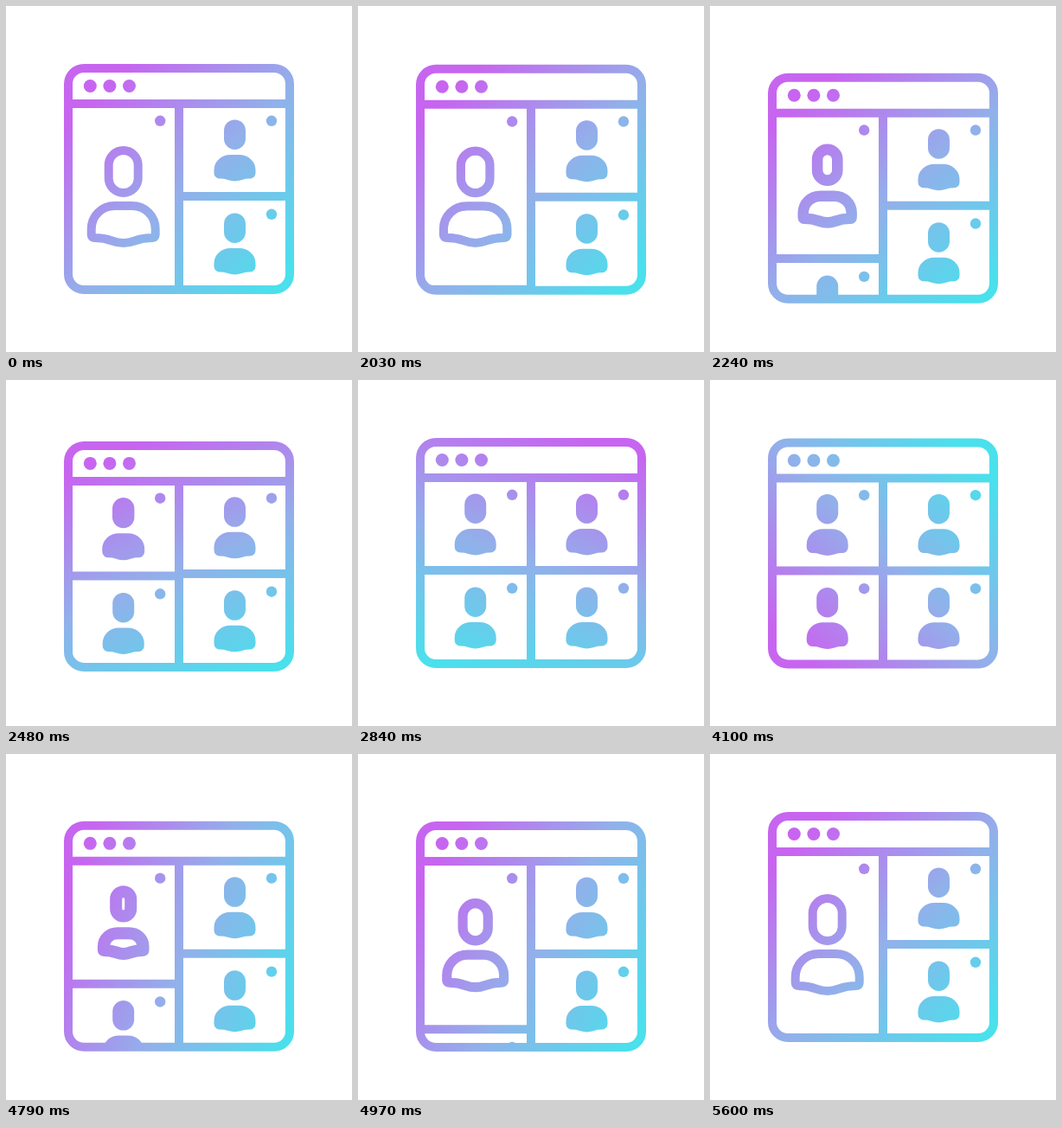
These frames come from a looping animation (400x400 px, 5660 ms). An HTML page with a canvas:

```html
<!DOCTYPE html>
<html lang="en">
<head>
<meta charset="utf-8">
<title>Video call layout</title>
<style>
  html, body { margin: 0; height: 100%; overflow: hidden; background: #fff; }
  canvas { display: block; width: 400px; height: 400px; }
</style>
</head>
<body>
<canvas width="400" height="400"></canvas>
<script>
const LOOP = 5660;
const ctx = document.querySelector('canvas').getContext('2d');
const mix = (a, b, k) => a + (b - a) * k;

// Cubic ease with flat ends; x1 and x2 are the horizontal handles.
function ease(t, from, to, x1 = 1 / 3, x2 = 2 / 3) {
  const u = Math.min(1, Math.max(0, (t - from) / (to - from)));
  if (u === 0 || u === 1) return u;
  let lo = 0, hi = 1, s = u;
  for (let i = 0; i < 20; i++) {
    s = (lo + hi) / 2;
    const x = 3 * (1 - s) ** 2 * s * x1 + 3 * (1 - s) * s * s * x2 + s ** 3;
    if (x < u) lo = s; else hi = s;
  }
  return s * s * (3 - 2 * s);
}

function setPaint(angle) {
  const c = 210, dx = 150 * Math.cos(angle), dy = 150 * Math.sin(angle);
  const paint = ctx.createLinearGradient(c - dx, c - dy, c + dx, c + dy);
  paint.addColorStop(0, '#c765f0');
  paint.addColorStop(0.5, '#92b0ea');
  paint.addColorStop(1, '#4ae0ec');
  ctx.fillStyle = ctx.strokeStyle = paint;
}

function dot(x, y, r) {
  ctx.beginPath();
  ctx.arc(x, y, r, 0, 7);
  ctx.fill();
}

function line(x1, y1, x2, y2) {
  ctx.lineWidth = 10;
  ctx.stroke(new Path2D(`M${x1} ${y1}L${x2} ${y2}`));
}

// The outline keeps its weight; the hole closes as `fill` goes to 1.
function outline(path, fill) {
  ctx.lineWidth = 10;
  ctx.stroke(path);
  if (fill === 1) ctx.fill(path);
  else if (fill > 0) {
    ctx.save();
    ctx.clip(path);
    ctx.lineWidth = 10 + 12 * fill;
    ctx.stroke(path);
    ctx.restore();
  }
}

const frame = new Path2D();
frame.roundRect(72, 72, 256, 256, 18);

const torso = new Path2D(`M-37 12V5.5C-37 -10 -25 -21.5 -10 -21.5H10
  C25 -21.5 37 -10 37 5.5V12Q37 15.5 33 15.5C14 15.5 13 21.5 0 21.5
  C-13 21.5 -14 15.5 -33 15.5Q-37 15.5 -37 12Z`);

// small: 0 = large outlined figure, 1 = small solid figure
function person(x, y, small) {
  const w = mix(34, 15, small), h = mix(49, 24.5, small);
  const head = new Path2D();
  head.roundRect(x - w / 2, y + mix(191.5, 148.7, small) - h / 2, w, h, w / 2);
  outline(head, small);

  const body = new Path2D();
  body.addPath(torso, new DOMMatrix([
    mix(1, 0.514, small), 0, 0, mix(1, 0.477, small),
    x, y + mix(252.5, 187.2, small)]));
  outline(body, small);
}

function cell(x, y, small = 1) {
  person(x, y, small);
  dot(x + 42.5, y + 132.8, 6.2);
}

function draw(t) {
  const grid = ease(t, 2000, 2530) - ease(t, 4590, 5120);
  const dip = 11 * (ease(t, 2000, 2200) - ease(t, 2200, 2670)
                  + ease(t, 4000, 4850) - ease(t, 4970, 5480));
  const turn = ease(t, 2000, 5600, 1 / 3, 0.46);
  const split = mix(328, 220, grid);

  ctx.clearRect(0, 0, 400, 400);
  ctx.save();
  ctx.translate(0, dip);
  ctx.lineJoin = 'round';
  setPaint(Math.PI * (0.25 + 2 * turn));

  ctx.lineWidth = 10;
  ctx.stroke(frame);
  for (const x of [97.3, 119.9, 142.5]) dot(x, 92.5, 7.5);
  line(72, 113, 328, 113);
  line(200, 113, 200, 328);
  line(200, 220, 328, 220);
  cell(264.5, 0);
  cell(264.5, 108);

  // The left column slides up from behind the lower edge.
  ctx.clip(frame);
  cell(135.7, 0, grid);
  line(72, split, 200, split);
  cell(135.7, split - 112);
  ctx.restore();
}

function tick() {
  draw(performance.now() % LOOP);
  requestAnimationFrame(tick);
}
tick();
</script>
</body>
</html>
```
